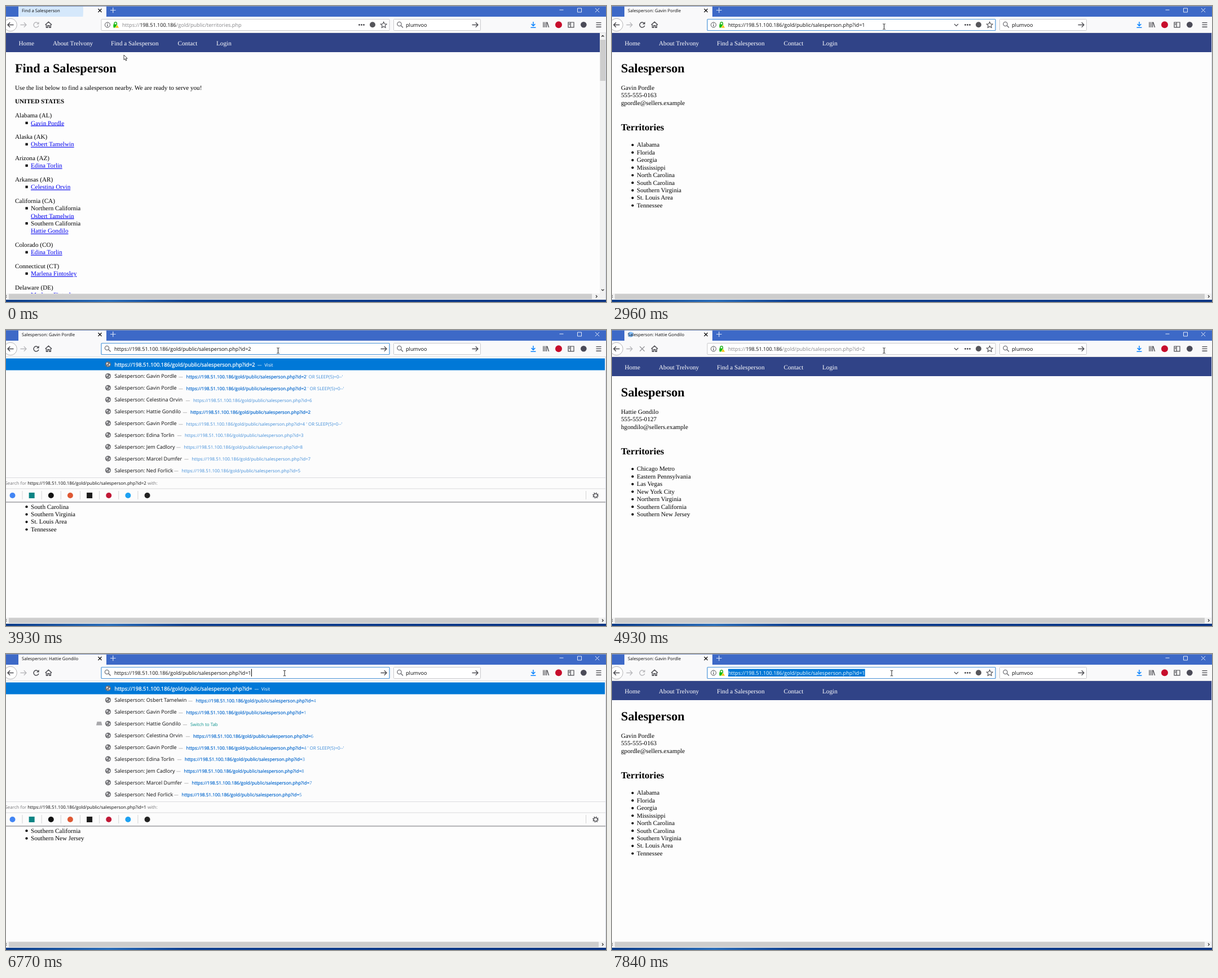
An HTML page for the animation above (7990 ms loop, 1064 by 526 pixels).

```html
<!DOCTYPE html>
<html lang="en">
<head>
<meta charset="utf-8">
<title>Browser session</title>
<style>
html, body { margin: 0; width: 100%; height: 100%; overflow: hidden; background: #fff; }
svg { display: block; width: 100vw; height: 100vh; font-family: "Open Sans", "Noto Sans", sans-serif; text-rendering: geometricPrecision; }
text { white-space: pre; }
.doc { font-family: "Liberation Serif", "Times New Roman", serif; }
.link { fill: #00e; text-decoration: underline; }
.line { fill: none; stroke-width: 1.2; }
</style>
</head>
<body>
<svg id="stage" viewBox="0 0 1064 526" preserveAspectRatio="none"></svg>
<script>
const LOOP = 7990;
const INK = '#0c0c0d', ICON = '#4a4a4f', PALE = '#b9b9bc', BLUE = '#0078d7';
const URL_SIZE = 9.13, SMALL = 7.93, BODY = 11.15;
const HOST = '198.51.100.186', DIR = '/gold/public/';
const PERSON_PATH = DIR + 'salesperson.php?id=';
const BASE = 'https://' + HOST + PERSON_PATH;

// name, and where the address begins in a suggestion row
const people = {
  gavin: ['Gavin Pordle', 319.5], osbert: ['Osbert Tamelwin', 336.5],
  edina: ['Edina Torlin', 317], celestina: ['Celestina Orvin', 332],
  hattie: ['Hattie Gondilo', 327], marlena: ['Marlena Fintosley', 0],
  jem: ['Jem Cadlory', 315.5], marcel: ['Marcel Dumfer', 329.5], ned: ['Ned Forlick', 311.5]
};

const pages = {
  gavin: ['555-555-0163', 'gpordle@sellers.example', ['Alabama', 'Florida', 'Georgia', 'Mississippi',
    'North Carolina', 'South Carolina', 'Southern Virginia', 'St. Louis Area', 'Tennessee']],
  hattie: ['555-555-0127', 'hgondilo@sellers.example', ['Chicago Metro', 'Eastern Pennsylvania', 'Las Vegas',
    'New York City', 'Northern Virginia', 'Southern California', 'Southern New Jersey']]
};

const states = [
  ['Alabama (AL)', ['gavin']], ['Alaska (AK)', ['osbert']], ['Arizona (AZ)', ['edina']],
  ['Arkansas (AR)', ['celestina']],
  ['California (CA)', ['osbert', 'Northern California'], ['hattie', 'Southern California']],
  ['Colorado (CO)', ['edina']], ['Connecticut (CT)', ['marlena']], ['Delaware (DE)', ['marlena']]
];

const SLEEP = "' OR SLEEP(5)=0--'";
const tail = [['celestina', '6'], ['gavin', '4 ' + SLEEP], ['edina', '3'], ['jem', '8'], ['marcel', '7'], ['ned', '5']];
const lists = {
  first: [['osbert', '4'], ['hattie', '2'], ['gavin', null], ...tail],
  two: [['gavin', '2' + SLEEP], ['gavin', '2 ' + SLEEP], tail[0], ['hattie', '2'], ...tail.slice(1)],
  again: [['osbert', '4'], ['gavin', '1'], ['hattie', null], ...tail]
};

const WAIT = 'Waiting for ' + HOST + '…';
const script = [
  [0, { page: 'list', id: '', mode: 'idle', reload: 'off', status: '' }],
  [680, { status: BASE + '1' }],
  [950, { reload: 'stop', busy: true, status: WAIT }],
  [1200, { page: 'gavin', id: '1', busy: false, status: '' }],
  [1580, { reload: 'off' }],
  [1860, { hover: true }],
  [2000, { mode: 'focus', selected: true }],
  [2130, { reload: 'on' }],
  [2570, { selected: false, caret: true }],
  [2960, { caret: false }],
  [3360, { mode: 'popup', id: '', caret: true, list: 'first', query: '' }],
  [3780, { id: '2' }],
  [3930, { list: 'two', query: '2', caret: false }],
  [4080, { caret: true }],
  [4450, { mode: 'idle', caret: false, reload: 'stop', busy: true, status: WAIT }],
  [4770, { status: '' }],
  [4930, { page: 'hattie', busy: false }],
  [5350, { reload: 'off' }],
  [5490, { mode: 'focus', selected: true }],
  [5750, { reload: 'on' }],
  [5990, { selected: false, caret: true }],
  [6520, { mode: 'popup', id: '', list: 'again', query: '' }],
  [6770, { id: '1' }],
  [6910, { query: '1' }],
  [7190, { mode: 'idle', caret: false, reload: 'stop', busy: true, status: WAIT }],
  [7450, { page: 'gavin', busy: false, status: '' }],
  [7700, { reload: 'off' }],
  [7840, { mode: 'focus', selected: true }]
];

const ticks = [0, 150, 280, 410, 550, 680, 810, 950, 1080, 1200, 1320, 1440, 1580, 1720, 1860, 2000, 2130, 2250,
  2570, 2960, 3360, 3500, 3640, 3780, 3930, 4080, 4450, 4610, 4770, 4930, 5070, 5210, 5350, 5490,
  5630, 5750, 5870, 5990, 6520, 6640, 6770, 6910, 7050, 7190, 7320, 7450, 7570, 7700, 7840];

const mouse = [[0, 209, 87], [150, 204, 93], [680, 76, 206], [1080, 76, 206], [1200, 130, 176], [1320, 283.5, 101],
  [1580, 430, 60], [1860, 478.5, 37], [2130, 478.5, 37], [2250, 482.5, 36.5], [5490, 482.5, 36.5],
  [5750, 495, 34], [5990, 494, 34], [7450, 494, 34], [7840, 496, 34]];

const bursts = [-300, 1300, 4920, 7440];

const pen = document.createElement('canvas').getContext('2d');
function widthOf(s, size) {
  pen.font = size * 10 + 'px "Open Sans", "Noto Sans", sans-serif';
  return pen.measureText(s).width / 10;
}

const text = (x, y, s, size, fill = INK, more = '') =>
  `<text x="${x}" y="${y}" font-size="${size}" fill="${fill}" ${more}>${s}</text>`;
const doc = (x, y, s, size = BODY, fill = '#000', more = '') => text(x, y, s, size, fill, 'class="doc" ' + more);
const span = (s, fill, more = '') => `<tspan fill="${fill}" ${more}>${s}</tspan>`;
const rect = (x, y, w, h, fill, more = '') => `<rect x="${x}" y="${y}" width="${w}" height="${h}" fill="${fill}" ${more}/>`;
const dot = (x, y, r, fill, more = '') => `<circle cx="${x}" cy="${y}" r="${r}" fill="${fill}" ${more}/>`;
const line = (d, color = ICON, w = 1.2) => `<path class="line" d="${d}" stroke="${color}" style="stroke-width:${w}"/>`;
const shape = (d, fill, more = '') => `<path d="${d}" fill="${fill}" ${more}/>`;
const cross = (x, y, r, color, w) => line(`M${x - r} ${y - r}l${2 * r} ${2 * r}m0 ${-2 * r}l${-2 * r} ${2 * r}`, color, w);
const lens = (x, y) => line(`M${x + 1.9} ${y + 1.2}l3.6 3.8`, '#737378', 1.6) + dot(x - 1, y - 1.5, 3.6, 'none', 'stroke="#737378" stroke-width="1.3"');
const goArrow = (x, y, color = ICON) => line(`M${x - 5.5} ${y}h10.5m-4.2-4.2l4.2 4.2l-4.2 4.2`, color, 1.3);
const backArrow = (x, y) => line(`M${x + 5.5} ${y}h-10.5m4.2-4.2l-4.2 4.2l4.2 4.2`, ICON, 1.5);

function listPage() {
  let y = 198;
  let out = doc(16, 118, 'Find a Salesperson', 22.3, '#000', 'font-weight="bold"') +
    doc(16, 149, 'Use the list below to find a salesperson nearby. We are ready to serve you!') +
    doc(16, 173, 'UNITED STATES', BODY, '#000', 'font-weight="bold"');
  for (const [state, ...items] of states) {
    out += doc(16, y, state);
    for (const [who, region] of items) {
      y += 13.5;
      out += rect(34.5, y - 5.8, 4.2, 4.2, '#000');
      if (region) { out += doc(44, y, region); y += 13.4; }
      out += `<text class="doc link" x="44" y="${y}" font-size="${BODY}">${people[who][0]}</text>`;
    }
    y += 24.4;
  }
  return out;
}

function personPage(who) {
  const [phone, mail, areas] = pages[who];
  return doc(16, 118, 'Salesperson', 22.3, '#000', 'font-weight="bold"') +
    [people[who][0], phone, mail].map((s, i) => doc(16, 149 + i * 13.44, s)).join('') +
    doc(16, 221, 'Territories', 16.7, '#000', 'font-weight="bold"') +
    areas.map((s, i) => dot(36.5, 247 + i * 13.44, 2.1, '#000') + doc(44, 250.4 + i * 13.44, s)).join('');
}

function drawPage(s) {
  const long = s.page === 'list', right = long ? 1053 : 1063;
  const nav = [[22.5, 'Home'], [83, 'About Trelvony'], [186, 'Find a Salesperson'], [304.5, 'Contact'], [373, 'Login']];
  let out = rect(0, 48, 1064, 463, '#fdfdfd') + rect(0, 48, right, 34, '#304387') +
    nav.map(([x, t]) => doc(x, 70, t, 11.2, '#fff')).join('') +
    `<g clip-path="url(#view)">${long ? listPage() : personPage(s.page)}</g>` +
    rect(0, 511, 1064, 11, '#f1f1f1') + rect(5, 511.5, long ? 1034 : 1046, 9.5, '#cdcdcd') +
    line('M1 514l-2 2l2 2', '#505050') + line(`M${long ? 1046 : 1057} 514l2.2 2.2l-2.2 2.2`, '#333');
  if (long) out += rect(1053, 48, 10, 463, '#f1f1f1') + rect(1053.5, 60, 9.5, 73, '#cdcdcd') +
    line('M1056 54.5l2.2-2.2l2.2 2.2', '#333') + line('M1056 503.5l2.2 2.2l2.2-2.2', '#333');
  out += rect(1063, 19, 1, 503, '#d4d8e4') + rect(0, 522, 1064, 4, 'url(#bar)');
  if (s.status) out += rect(-1, 508, 6 + widthOf(s.status, SMALL), 14, '#f0f0f0', 'stroke="#c4c4c4" stroke-width=".7"') +
    text(1, 518, s.status, SMALL, '#333');
  return out;
}

function drawTab(s, t) {
  const title = s.page === 'list' ? 'Find a Salesperson' : 'Salesperson: ' + people[s.page][0];
  let out = rect(0, 0, 1064, 19, '#3d69c7') + rect(0, 0, 1064, 1, '#7f93bd') + rect(22, 1, 156, 18, '#f9f9fa');
  for (const b of bursts) {
    const age = t - b;
    if (age >= 0 && age < 380)
      out += dot(33, 8, 4 + 100 * (age / 300) ** 1.4, '#45a1ff', `opacity="${0.65 * (1 - age / 430)}" clip-path="url(#tab)"`);
  }
  if (s.busy) out += dot(34 + 4 * Math.sin(t / 110), 8, 2.4, '#45a1ff');
  return out + text(s.busy ? 44 : 28, 11, title, 7.75) + cross(166.5, 8, 3, INK, 1.2) +
    line('M185 7.5h9.6m-4.8-4.8v9.6', '#d8e2f6', 1.2) + line('M981.5 7h7', '#e4ebf8', 1) +
    line('M1013.5 4h7v7h-7z', '#e4ebf8', 1) + cross(1048.5, 7.5, 3.6, '#e4ebf8', 1);
}

function drawUrl(s) {
  const open = s.mode === 'popup', focus = s.mode !== 'idle';
  const path = s.page === 'list' ? DIR + 'territories.php' : PERSON_PATH + s.id;
  const full = 'https://' + HOST + path, x = open ? 192 : 206, w = widthOf(full, URL_SIZE);
  let out = rect(169, 23.5, 511, 20, '#fff', `stroke="${focus ? '#4b94d8' : '#c9c9cc'}" stroke-width="${focus ? 1.2 : 1}" rx="1"`);
  if (open) out += lens(180, 33.5) + goArrow(670, 33.5);
  else {
    out += dot(180, 33.5, 4.5, 'none', `stroke="${ICON}"`) + rect(179.4, 32.8, 1.2, 3.4, ICON) + rect(179.4, 30.6, 1.2, 1.2, ICON) +
      line('M192 33v-2.2a2.2 2.2 0 0 1 4.4 0v2.2', '#12a810', 1.4) + rect(190.4, 32.5, 7, 6, '#12bc00', 'rx=".8"') +
      shape('M197 33l3.6 6h-7.2z', '#f6c614', 'stroke="#fff" stroke-width=".6"') +
      [626.5, 630.5, 634.5].map(cx => dot(cx, 33.5, 1.4, ICON)).join('') + dot(650, 33.3, 5, '#55555a') +
      line('M669.7 28.2l1.6 3.5l3.8.4l-2.8 2.6l.8 3.7l-3.4-1.9l-3.4 1.9l.8-3.7l-2.8-2.6l3.8-.4z', ICON, 1.1);
    if (s.hover) out += line('M607 32l3.5 3.4l3.5-3.4', ICON);
  }
  if (s.selected) out += rect(x, 26.5, w, 13.5, BLUE);
  const soft = s.selected ? '#fff' : focus ? INK : '#858588', hard = s.selected ? '#fff' : INK;
  out += `<text x="${x}" y="36.8" font-size="${URL_SIZE}">${span('https://', soft)}${span(HOST, hard)}${span(path, soft)}</text>`;
  if (s.caret) out += rect(x + w + .2, 26.5, 1, 13.5, '#000');
  return out;
}

function drawTools(s) {
  const reload = s.reload === 'stop' ? cross(53.5, 33.5, 4.2, '#949498', 1.3) :
    [s.reload === 'on' ? ICON : PALE].map(c => line('M56.8 30.4a4.5 4.5 0 1 0 1.1 4.4', c, 1.4) + shape('M58.6 28v4.6h-4.6z', c)).join('');
  return rect(0, 19, 1064, 29, '#f9f9fa') + rect(0, 47.3, 1064, .7, '#d5d5d8') +
    dot(8, 33.5, 11.3, '#fff', 'stroke="#b4b4b6"') + backArrow(8, 33.5) + goArrow(31, 33.5, PALE) + reload +
    line('M69.6 33.6l5.8-5.3l5.8 5.3M71.5 33v5.2h2.5v-3.4h2.8v3.4h2.5v-5.2', ICON, 1.4) +
    rect(687.5, 23.5, 154, 20, '#fff', 'stroke="#c9c9cc" rx="1"') + lens(698.5, 33.5) +
    text(709, 36.8, 'plumvoo', URL_SIZE) + goArrow(832, 33.5) +
    line('M935 28v7.2m-3.4-3.2l3.4 3.4l3.4-3.4M930.5 38.3h9', '#0a84ff', 1.5) +
    line('M953 28.5v9.5m2.8-9.5v9.5m2.8-9.5v9.5m1-9.3l3 9.3', ICON, 1.3) + dot(980, 33.3, 6, '#c70d2c') +
    line('M997 29h10v8.8h-10zM1001.3 29v8.8M998.3 31.3h1.8m-1.8 2h1.8', ICON, 1.2) + dot(1024.3, 33.3, 5.3, '#4b4b58') +
    line('M1046.5 29.6h9m-9 3.8h9m-9 3.8h9', ICON, 1.4);
}

const globe = y => dot(181, y, 5, '#6f6f73') +
  shape(`M178 ${y - 3}l3 .2l-.6 2.2l-2.2 1.6zM182.5 ${y - 1.2}l2.4.6l-.8 2.8l-1.8.4zM179.4 ${y + 1.6}l2 .8l-.8 1.6z`, '#e3e3e5');

function drawRow([who, id], query, y) {
  const [name, x] = people[who];
  const head = globe(y - .5) + text(192.5, y + 3, 'Salesperson: ' + name, 9.08) + text(x - 13.5, y + 3.4, '—', SMALL, '#8b8b8e');
  if (id === null)
    return head + shape(`M161.5 ${y - 4}h7.5l1.5 6.5h-10.5z`, '#a9a9ac') + text(x, y + 3.4, 'Switch to Tab', SMALL, '#08928c');
  const full = BASE + id, mark = BASE + query, hit = full.startsWith(mark);
  const [strong, rest] = hit ? [mark, full.slice(mark.length)] : ['', full];
  return head + `<text x="${x}" y="${y + 3.4}" font-size="${hit ? 8.02 : SMALL}">` +
    span(strong, '#0b6bce', 'stroke="#0b6bce" stroke-width=".22"') + span(rest, '#3f8cd8') + '</text>';
}

function drawPopup(s) {
  const engines = [['#4285f4', 0], ['#0c8484', 1], ['#111', 0], ['#de5833', 0], ['#1c1c1c', 1], ['#c01836', 0], ['#1da1f2', 0], ['#222', 0]];
  const asked = BASE + s.query;
  let out = rect(0, 48, 1063, 258, '#fcfcfc') + rect(0, 50.5, 1062, 21, BLUE) + globe(61) +
    `<text x="192.5" y="64.8" font-size="9.38" fill="#fff"><tspan stroke="#fff" stroke-width=".28">${asked}</tspan>` +
    `<tspan dx="4" font-size="${SMALL}">—</tspan><tspan dx="4.5" font-size="${SMALL}">Visit</tspan></text>` +
    lists[s.list].map((r, i) => drawRow(r, s.query, 82.4 + i * 20.93)).join('') +
    rect(0, 262, 1063, 1, '#dcdcde') +
    `<text x="-1.5" y="275.4" font-size="${SMALL}">${span('Search for ', '#77777a')}${span(BASE + s.id, INK)}${span(' with:', '#77777a')}</text>` +
    rect(0, 281.5, 1063, 1, '#dcdcde');
  engines.forEach(([color, square], i) => {
    const x = 11.5 + i * 34.15;
    out += square ? rect(x - 5, 289, 10, 10, color) : dot(x, 294, 5, color);
    if (i < 7) out += rect(x + 17, 286, 1, 15, '#d4d4d6');
  });
  return out + rect(1028, 286, 1, 15, '#d4d4d6') +
    dot(1045.5, 294, 3.2, 'none', `stroke="${ICON}" stroke-width="1.3"`) +
    dot(1045.5, 294, 4.6, 'none', `stroke="${ICON}" stroke-width="1.6" stroke-dasharray="1.6 2.01"`) +
    rect(0, 305, 1063, 1.6, '#a2a2a6');
}

function drawMouse(t) {
  const i = Math.max(0, mouse.findLastIndex(k => k[0] <= t));
  const a = mouse[i], b = mouse[i + 1] || a;
  const p = b === a ? 0 : (t - a[0]) / (b[0] - a[0]);
  const x = a[1] + (b[1] - a[1]) * p, y = a[2] + (b[2] - a[2]) * p;
  const edge = 'stroke="#111" stroke-width=".8" stroke-linejoin="round"';
  const form = t >= 1720 ? line('M-2.2-4.6h1.7l.5.5l.5-.5h1.7M0-4.2v8.6M-2.2 4.8h1.7l.5-.5l.5.5h1.7', '#222', 1) :
    t >= 550 && t < 1200 ? shape('M-1 .5q1-1.2 1.8 0v3.6l4 1q1 .4.8 1.6l-.8 3.8h-5l-3-4q.2-1.6 2.2-.2z', '#fff', edge) :
    shape('M0 0v8.6l2-1.8l1.5 3.4l1.5-.7l-1.5-3.3h2.7z', '#fff', edge);
  return `<g transform="translate(${x} ${y})">${form}</g>`;
}

const defs = `<defs><clipPath id="tab"><rect x="22" y="1" width="156" height="18"/></clipPath>
  <clipPath id="view"><rect x="0" y="82" width="1053" height="429"/></clipPath>
  <linearGradient id="bar"><stop offset="0" stop-color="#0b3a86"/><stop offset=".17" stop-color="#2a6db8"/>
  <stop offset=".3" stop-color="#0f3f8f"/><stop offset="1" stop-color="#0c3583"/></linearGradient></defs>`;

function scene(t) {
  const s = Object.assign({}, ...script.filter(e => e[0] <= t).map(e => e[1]));
  return defs + drawPage(s) + drawTools(s) + drawTab(s, t) + drawUrl(s) +
    (s.mode === 'popup' ? drawPopup(s) : '') + drawMouse(t);
}

const stage = document.getElementById('stage');
const start = performance.now();
let shown = -1;
function frame() {
  const now = (performance.now() - start) % LOOP;
  const t = ticks.findLast(v => v <= now);
  if (t !== shown) {
    stage.innerHTML = scene(t);
    shown = t;
  }
  requestAnimationFrame(frame);
}
frame();
</script>
</body>
</html>
```
